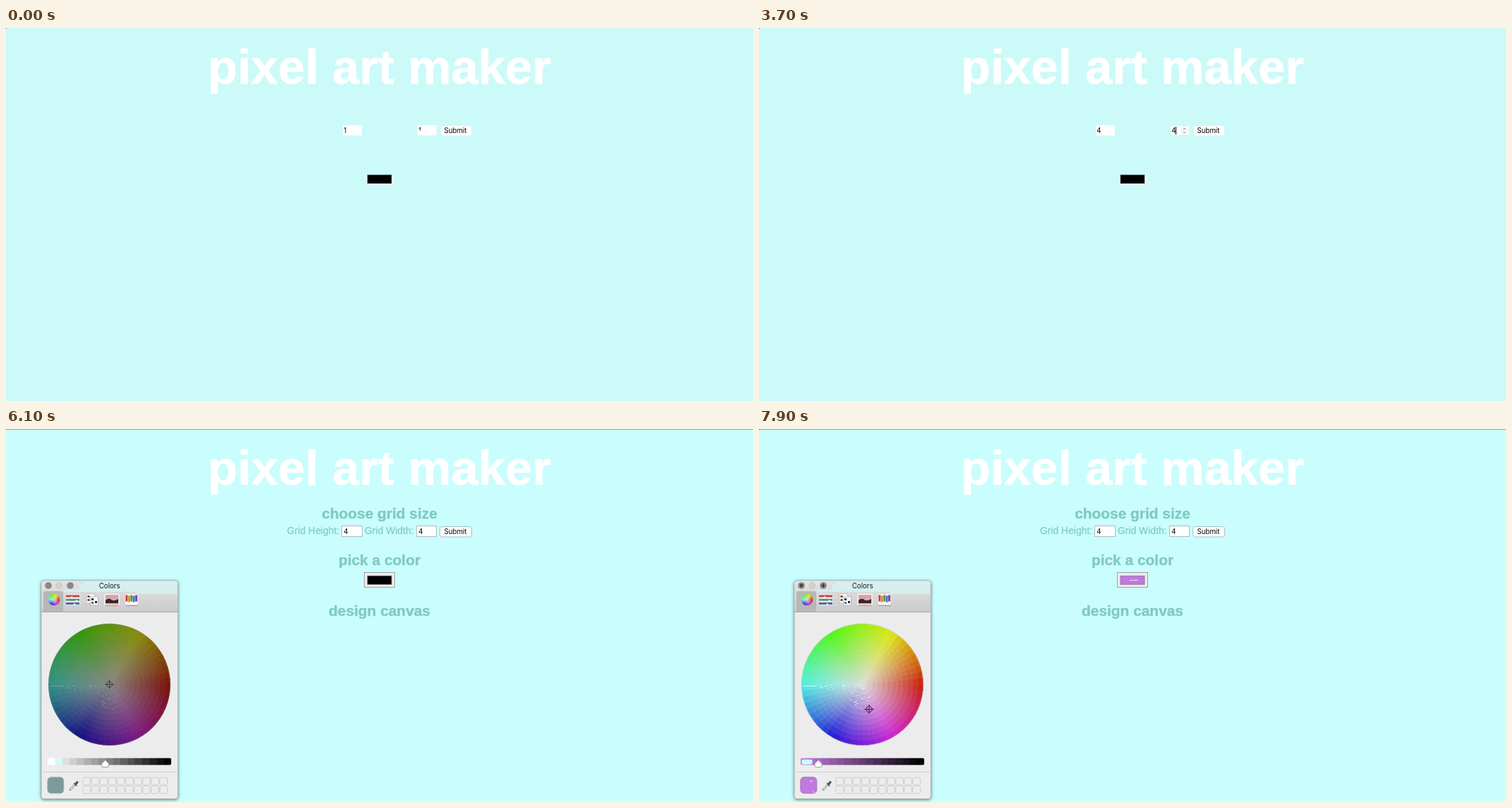
An HTML page that plays this animation: 1058 by 529 pixels, repeating every 8000 ms.

```html
<!DOCTYPE html>
<html lang="en">
<head>
<meta charset="utf-8">
<title>pixel art maker</title>
<style>
  html, body { margin: 0; width: 100%; height: 100%; overflow: hidden; background: #ccfaf9; }
  svg { display: block; width: 1058px; height: 529px; }
  text { font-family: "Liberation Sans", Arial, sans-serif; }
  .title { font-size: 68.9px; font-weight: bold; fill: #fff; stroke: #fff; stroke-width: .6px; }
  .head { font-size: 20.9px; font-weight: bold; fill: #80cac2; stroke: #80cac2; stroke-width: .4px; }
  .label { font-size: 13.9px; fill: #80cac2; stroke: #80cac2; stroke-width: .2px; }
  .ui { font-family: Inter, Roboto, sans-serif; font-size: 9.7px; fill: #000; }
</style>
</head>
<body>
<svg viewBox="0 0 1058 529" xmlns="http://www.w3.org/2000/svg">
  <defs>
    <linearGradient id="bar" x2="0" y2="1">
      <stop stop-color="#e2e4e4"/><stop offset="1" stop-color="#cbcbcb"/>
    </linearGradient>
    <linearGradient id="dusk" x2="0" y2="1">
      <stop stop-color="#c9a0b4"/><stop offset="1" stop-color="#f0b09c"/>
    </linearGradient>
    <clipPath id="tick"><rect x="583" y="139" width="25" height="6.6"/></clipPath>
    <clipPath id="track"><rect x="59" y="466.8" width="175" height="9.8" rx="2"/></clipPath>
    <clipPath id="lowRight"><path d="M77 234V251H61V244Q70 248 71 234Z"/></clipPath>
    <g id="rainbow" shape-rendering="crispEdges"></g>
  </defs>

  <rect id="page" width="1058" height="529"/>
  <rect id="topLine" width="1058" height="1" fill="#8fa9a9"/>
  <rect width="1" height="1" fill="#345"/>
  <text class="title" x="529" y="79" text-anchor="middle">pixel art maker</text>

  <g id="labels">
    <g class="head" text-anchor="middle">
      <text x="529" y="126.5">choose grid size</text>
      <text x="529" y="193">pick a color</text>
      <text x="529" y="264.5">design canvas</text>
    </g>
    <text class="label" x="398" y="149">Grid Height:</text>
    <text class="label" x="508" y="149">Grid Width:</text>
    <g fill="#fff" stroke="#a9bfbf">
      <rect x="475.5" y="137.5" width="29" height="15"/>
      <rect x="581.5" y="137.5" width="28" height="15"/>
      <rect x="614.5" y="138.5" width="45" height="14.5" rx="3"/>
    </g>
    <rect x="507.5" y="203.5" width="43" height="21" fill="#ececec" stroke="#9ca4a4"/>
  </g>

  <g id="plain" fill="#fff">
    <rect id="box1"/>
    <rect id="box2"/>
    <rect x="616" y="139" width="43" height="13.5" rx="3"/>
    <rect id="glow" x="510" y="208" width="39" height="14.5" fill="#f0f8f4"/>
  </g>
  <text id="num1" class="ui" x="478.2" y="149"></text>
  <text id="num2" class="ui" x="584.2" y="149"></text>
  <text class="ui" x="620.5" y="149">Submit</text>
  <g id="focus">
    <path d="M484.5 140V151" stroke="#000"/>
    <rect x="492.5" y="139.5" width="8" height="12" rx="3" fill="#fff" stroke="#e2e8e8"/>
    <path d="M495 144l1.6-2 1.6 2M495 147l1.6 2 1.6-2" fill="none" stroke="#666" stroke-width=".9"/>
  </g>
  <rect id="well" x="512" y="208.3" width="34" height="12" stroke-width=".8"/>
  <path id="wellMark" d="M525 214.5H537" stroke="#f5dcfb"/>

  <g id="panel">
    <g id="chrome">
      <rect x="50" y="215" width="193.5" height="309.5" rx="4" fill="#ececec" stroke="#9eabab" stroke-width=".8"
        style="filter:drop-shadow(0 1px 2px rgba(0,0,0,.5))"/>
      <path d="M50.4 259V219Q50.4 215.4 54 215.4H239.5Q243.1 215.4 243.1 219V259Z" fill="url(#bar)"/>
      <path d="M110 216.5H242V235Q241 234 238 234H185V231H82V228H104V220H110Z" fill="#d4f5f4" opacity=".75"/>
      <path d="M50 259.5H243.5" stroke="#a8a8a8"/>
      <path d="M53 259V233Q53 230 56 230H78Q81 230 81 233V259Z" fill="#b7b7b7"/>
      <circle cx="60" cy="222" r="4.8" fill="#8b8789"/>
      <circle cx="75.3" cy="222" r="4.5" fill="#d3d2d3" stroke="#bbb" stroke-width=".6"/>
      <circle cx="91" cy="222" r="4.8" fill="#8b8789"/>
      <path id="signs" d="M58 220l4 4m0-4l-4 4M88 222h6m-3-3v6" stroke="#222" stroke-width="1.2"/>
    </g>
    <g id="bare">
      <rect x="52" y="260" width="191" height="263" fill="#ececec"/>
      <path d="M55 215.5H240" stroke="#e8fbfa"/>
      <path d="M91 499.5H230M91 515.5H230M112 506.5H230" stroke="#d6f3f1" stroke-dasharray="9 3" opacity=".7"/>
      <g fill="none" stroke="#6d8a8a" stroke-width=".8" stroke-dasharray="1.5 3">
        <circle cx="60" cy="222" r="4.6"/><circle cx="91" cy="222" r="4.6"/>
      </g>
    </g>
    <text class="ui" x="131.8" y="226" id="caption">Colors</text>

    <g id="mini"><use href="#rainbow" transform="translate(68 242) scale(.095)"/></g>
    <rect x="85" y="234" width="20" height="16" fill="#e4e4e8" id="slideBack"/>
    <path d="M85 237H104" stroke="#c33b42" stroke-width="2.6"/>
    <path id="greenBar" d="M85 242.3H104" stroke="#45a054" stroke-width="2.6"/>
    <path d="M85 247.5H104" stroke="#4a52b0" stroke-width="2.6"/>
    <path d="M91 239l2-2 2 2zM98 244l2-2 2 2zM95 249l2-2 2 2z" fill="#fff"/>
    <rect x="114" y="234" width="11" height="13" fill="#fafafa" stroke="#aaa" stroke-width=".6"/>
    <rect x="119.5" y="238" width="11" height="12" fill="#fafafa" stroke="#999" stroke-width=".6"/>
    <path d="M115.5 236h3v3h-3zm0 5h3v3h-3z" fill="#9c3b36"/>
    <path d="M121 240h3v3h-3zm5 4h3v3h-3z" fill="#202830"/>
    <path d="M121 245h3v3h-3z" fill="#3d70ad"/>
    <rect x="140" y="234.5" width="20" height="15.5" fill="url(#dusk)" stroke="#f4f4f4" stroke-width="1.5"/>
    <path d="M141 243Q145 239 149 242T159 241V247H141Z" fill="#33262b"/>
    <path d="M140 250.5H160M169 250.5H187" stroke="#888" stroke-width=".8"/>
    <rect x="169" y="234" width="17.5" height="15.5" fill="#f6f6f6"/>
    <g id="pencils"></g>

    <g id="wheel">
      <use href="#rainbow" transform="translate(146.5 362.5)"/>
      <g id="specks" fill="#d6fcfb"></g>
      <circle cx="146.5" cy="362.5" r="86.3" fill="none" stroke="#c4d0cc" stroke-opacity=".75"/>
    </g>
    <circle id="shade" cx="146.5" cy="362.5" r="86.5"/>
    <g id="cross" fill="none"><circle r="4.2"/><path d="M-6.5 0H6.5M0-6.5V6.5"/></g>

    <g id="steps" clip-path="url(#track)"></g>
    <g id="bareTrack">
      <rect x="59" y="466.8" width="93" height="9.8" fill="#ccfaf9"/>
      <path d="M61 467H70V476.5H61Q59 476.5 59 474.5V469Q59 467 61 467" fill="#fff"/>
      <path d="M70 467H75V476.5H70Z" fill="#ececec"/>
    </g>
    <rect id="patch" y="468.8" height="7" rx="2" fill="#ccfdfc"/>
    <path id="thumb" d="M0-5L5 0V3.5Q5 5 3.5 5H-3.5Q-5 5-5 3.5V0Z" fill="#fff" stroke-width=".8"/>
    <path id="rule" d="M52 486.5H242" stroke="#cfcfcf"/>
    <rect id="swatch" x="58.8" y="493.8" width="23" height="23" rx="5" stroke-width=".8"/>
    <path id="corner" d="M74 493H82V501Z" fill="#a4cfca"/>
    <path id="swatchMark" d="M72 499.5H76M76 514.5L79 515.5" stroke="#f4dcfa"/>
    <g id="dropper" stroke-linecap="round">
      <path d="M91 511.5L98 504" stroke="#888" stroke-width="2.8"/>
      <path d="M91.5 511L96.5 505.5" stroke="#f4f4f4" stroke-width="1.2"/>
      <path d="M99 503L101 501" stroke="#555" stroke-width="3.2"/>
      <path d="M96.5 502.5L100 506" stroke="#555" stroke-width="1.4"/>
    </g>
    <path id="dropTip" d="M95.5 503L102 500L99.5 507L98 504.5Z" fill="#4f7775"/>
    <g id="slots" fill="none" stroke="#cacaca" stroke-width=".9"></g>
  </g>
</svg>
<script>
const LOOP = 8000;
const PICKER = 4800, REDRAW = 5900, DRAG_END = 6250;
const $ = id => document.getElementById(id);
const clamp = v => Math.max(0, Math.min(1, v));
const ease = v => v * v * (3 - 2 * v);
const ramp = (t, a, b) => ease(clamp((t - a) / (b - a)));
const lerp = (a, b, k) => a + (b - a) * k;
const mix = (a, b, k) => a.map((v, i) => lerp(v, b[i], k));
const rgb = c => `rgb(${c.map(Math.round)})`;
const show = (on, ...ids) =>
  ids.forEach(id => $(id).setAttribute("visibility", on ? "visible" : "hidden"));

function set(node, attrs) {
  for (const k in attrs) node.setAttribute(k, attrs[k]);
  return node;
}
function add(parent, tag, attrs) {
  const node = document.createElementNS("http://www.w3.org/2000/svg", tag);
  return parent.appendChild(set(node, attrs));
}

const WHITE = [255, 255, 255], PURPLE = [193, 121, 221], CYAN = [202, 253, 253], BLACK = [0, 0, 0];
const HUES = [[202, 24, 8], [222, 230, 14], [78, 248, 14], [76, 240, 224], [30, 22, 216], [206, 34, 214]];
const CENTRE = [221, 221, 219];

// Colour wheel: sectors painted ring by ring, from the rim inwards.
const RADIUS = 86.5, RINGS = 12, SECTORS = 60;
for (let ring = RINGS; ring > 0; ring--) {
  const r = RADIUS * ring / RINGS;
  for (let s = 0; s < SECTORS; s++) {
    const a = s / SECTORS * 2 * Math.PI, b = (s + 1) / SECTORS * 2 * Math.PI;
    const h = (s + .5) / SECTORS * 6, i = Math.floor(h);
    const hue = mix(HUES[i], HUES[(i + 1) % 6], h - i);
    const point = q => `${(r * Math.cos(q)).toFixed(2)} ${(-r * Math.sin(q)).toFixed(2)}`;
    add($("rainbow"), "path", {
      d: `M0 0L${point(a)}A${r} ${r} 0 0 0 ${point(b)}Z`,
      fill: rgb(mix(CENTRE, hue, (ring - .5) / RINGS))
    });
  }
}

// Pale flecks on the cyan side.
let seed = 11;
const rand = () => (seed = seed * 16807 % 2147483647) / 2147483647;
add($("specks"), "rect", { x: 62, y: 364, width: 20, height: 1 });
for (let i = 0; i < 46; i++) {
  const low = i % 3 === 0;
  add($("specks"), "rect", {
    x: Math.round(low ? 130 + rand() * 26 : 86 + rand() * 62),
    y: Math.round(low ? 372 + rand() * 26 : 362 + rand() * 6),
    width: 1 + Math.round(rand()), height: 1
  });
}

["#c33", "#e08a2c", "#3c9d45", "#3a6fc4", "#7a3bb0"].forEach((fill, i) =>
  add($("pencils"), "rect", { x: 169.5 + i * 3.4, y: 235.5 + i % 2, width: 2.8, height: 9, fill }));

const STEPS = 17;
const steps = Array.from({ length: STEPS }, (_, i) =>
  add($("steps"), "rect", { x: 59 + i * 175 / STEPS, y: 466, width: 175 / STEPS + .5, height: 11 }));

for (let i = 0; i < 20; i++) {
  add($("slots"), "rect", {
    x: 109 + i % 10 * 12.1, y: 494.2 + Math.floor(i / 10) * 12, width: 10.6, height: 10.8, rx: 2
  });
}

// A focused field loses a thin edge of its white box.
function field(id, x, focused) {
  const inset = focused ? 1 : 0;
  set($(id), { x: x + inset, y: 138 + inset, width: 27 - 2 * inset, height: 14.5 - 2 * inset });
}

function drawForm(t, late) {
  const focus1 = t >= 1300 && t < 3050, focus2 = t >= 3100 && t < 4000;
  const typed2 = t >= 3500, purple = t >= 7000;

  $("num1").textContent = t >= 2400 ? "4" : "1";
  $("num2").textContent = typed2 ? "4" : "1";
  set($("num2"), { "clip-path": typed2 ? "none" : "url(#tick)" });
  field("box1", 477, focus1);
  field("box2", 582.5, focus2);
  show(focus1 || focus2, "focus");
  set($("focus"), { transform: `translate(${focus2 ? 106 : 0} 0)` });

  show(!late && (t < 4100 || t >= PICKER), "glow");
  set($("well"), { fill: purple ? rgb(PURPLE) : "#000", stroke: purple ? "#8c6a99" : "#555" });
  show(purple, "wellMark", "swatchMark");
}

function drawPicker(t, late) {
  const light = ramp(t, REDRAW, DRAG_END);
  const pick = ramp(t, 6800, 7100);

  show(late, "chrome", "rule", "slots", "dropper", "greenBar", "slideBack", "wheel", "patch");
  show(!late, "bare", "bareTrack", "corner", "dropTip");
  show(t >= 7700, "signs");
  set($("caption"), { opacity: late ? .9 : .7 });
  set($("mini"), { "clip-path": late ? "none" : "url(#lowRight)" });

  set($("shade"), { opacity: 1 - light });
  set($("cross"), {
    transform: `translate(${lerp(146.5, 156, pick)} ${lerp(362.3, 397.5, pick)})`,
    stroke: light < .4 ? "#b8e4e2" : rgb(mix([60, 60, 60], [70, 15, 80], pick))
  });

  const tint = mix(WHITE, PURPLE, pick);
  steps.forEach((s, i) => set(s, { fill: rgb(mix(tint, BLACK, i / (STEPS - 1))) }));
  set($("patch"), pick > .5 ? { x: 60.5, width: 15 } : { x: 71, width: 9 });
  set($("thumb"), {
    transform: `translate(${lerp(229.5, 84, light)} 474.5)`,
    stroke: late ? "#8a8a8a" : "none"
  });
  set($("swatch"), {
    fill: rgb(mix(mix(BLACK, CYAN, light), PURPLE, pick)),
    stroke: late ? rgb(mix([169, 180, 180], [154, 108, 174], pick)) : "none"
  });
}

function draw(t) {
  const late = t >= REDRAW;
  set($("page"), { fill: late ? rgb(CYAN) : "#ccfaf9" });
  show(late, "topLine", "labels");
  show(!late, "plain");
  drawForm(t, late);
  $("panel").style.display = t >= PICKER ? "" : "none";
  drawPicker(t, late);
}

function tick(now) {
  draw(now % LOOP);
  requestAnimationFrame(tick);
}
draw(0);
requestAnimationFrame(tick);
</script>
</body>
</html>
```
